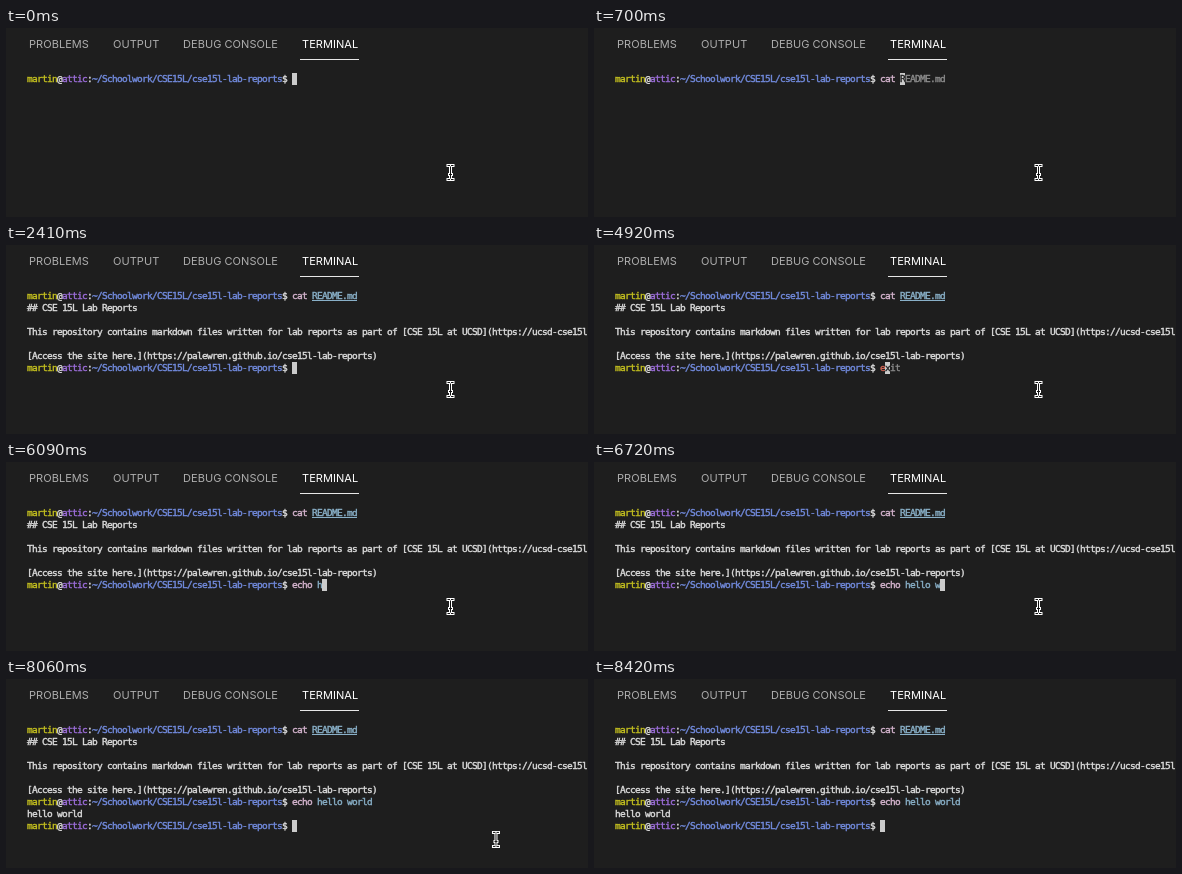
Recreate the animation shown at these times as an HTML page. Size 582 px wide and 189 px high, loop 8.79 s.

```html
<!DOCTYPE html>
<html lang="en">
<head>
<meta charset="utf-8">
<title>Terminal session</title>
<style>
  html, body { margin: 0; width: 100%; height: 100%; overflow: hidden; background: #1e1e1e; }
  svg { display: block; width: 582px; height: 189px; }
  text { white-space: pre; }
  .tab { font: 11px Inter, "Liberation Sans", sans-serif; letter-spacing: .05px; fill: #adadad; }
  .on { fill: #fff; }
  .mono { font: 9.5px "DejaVu Sans Mono", "Liberation Mono", monospace; stroke-width: .4px; }
</style>
</head>
<body>
<svg viewBox="0 0 582 189" xmlns="http://www.w3.org/2000/svg">
  <rect width="582" height="189" fill="#1e1e1e"/>
  <text class="tab" x="23" y="20">PROBLEMS</text>
  <text class="tab" x="107" y="20">OUTPUT</text>
  <text class="tab" x="177" y="20">DEBUG CONSOLE</text>
  <text class="tab on" x="296" y="20">TERMINAL</text>
  <rect x="294" y="31" width="59" height="1" fill="#e7e7e7"/>
  <g id="screen" class="mono"></g>
  <g id="mouse" fill="none">
    <path stroke="#fff" stroke-width="3" d="M-4-7H4M0-7V7M-4 7H4M-2.5 2H2.5"/>
    <path stroke="#111" d="M-3-7H-.5M.5-7H3M0-6V6M-3 7H-.5M.5 7H3M-1.5 2H1.5"/>
  </g>
</svg>
<script>
const LOOP = 8790, CELL = 5, LINE = 12, LEFT = 21, TOP = 45;
const color = {
  user: '#c5c11f', host: '#9d6edb', path: '#728bde', text: '#dcdcdc',
  command: '#d6b5cf', arg: '#89b0c8', bad: '#d06555', hint: '#8c8c8c',
  block: '#cbcbcb', dark: '#1e1e1e'
};
const prompt = [
  ['martin', color.user], ['@', color.text], ['attic', color.host], [':', color.text],
  ['~/Schoolwork/CSE15L/cse15l-lab-reports', color.path], ['$ ', color.text]
];
const start = prompt.reduce((n, [s]) => n + s.length, 0);

const output = [
  '## CSE 15L Lab Reports', '',
  'This repository contains markdown files written for lab reports as part of [CSE 15L at UCSD](https://ucsd-cse15l-', '',
  '[Access the site here.](https://palewren.github.io/cse15l-lab-reports)'
];

// Each session: prompt row, and [time, typed text, suggested rest]
const sessions = [
  { row: 0, end: 2410, keys: [
    [0, '', ''], [350, 'c', 'lear'], [520, 'ca', 't README.md'], [610, 'cat', ' README.md'],
    [700, 'cat ', 'README.md'], [1060, 'cat R', 'EADME.md'],
    [1330, 'cat README.md ', ''], [2050, 'cat README.md', '']
  ] },
  { row: 6, end: 7250, keys: [
    [2410, '', ''], [4920, 'e', 'xit'], [5100, 'ec', 'ho hello'], [5190, 'ech', 'o hello'],
    [5460, 'echo ', 'hello'], [6090, 'echo h', ''], [6270, 'echo hel', ''],
    [6450, 'echo hell', ''], [6540, 'echo hello', ''], [6630, 'echo hello ', ''],
    [6720, 'echo hello w', ''], [6810, 'echo hello wo', ''],
    [6900, 'echo hello wor', ''], [6980, 'echo hello world', '']
  ] },
  { row: 8, end: Infinity, keys: [[7250, '', '']] }
];

const screen = document.getElementById('screen');
const mouse = document.getElementById('mouse');

const colX = col => LEFT + col * CELL;
const rowY = row => TOP + row * LINE;

function add(tag, attrs, content = '') {
  const el = document.createElementNS('http://www.w3.org/2000/svg', tag);
  for (const name in attrs) el.setAttribute(name, attrs[name]);
  el.textContent = content;
  screen.append(el);
}

function box(col, row, cells, dy, height, fill) {
  add('rect', { x: colX(col), y: rowY(row) + dy, width: cells * CELL, height, fill });
}

// Places text on the character grid and returns the next column
function write(col, row, s, fill) {
  if (s) {
    const x = [...s].map((_, i) => colX(col + i)).join(' ');
    add('text', { x, y: rowY(row) + 9, fill, stroke: fill }, s);
  }
  return col + s.length;
}

function drawPrompt(row) {
  let col = 0;
  for (const [s, fill] of prompt) col = write(col, row, s, fill);
}

function drawCommand(row, typed) {
  const [word] = typed.split(' ');
  const known = word === 'cat' || word === 'echo';
  const col = write(start, row, word, known ? color.command : color.bad);
  const rest = typed.slice(word.length);
  write(col, row, rest, color.arg);
  const name = rest.trim();
  if (word === 'cat' && name) box(col + 1, row, name.length, 10, 1, color.arg);
}

function drawScreen(t) {
  screen.replaceChildren();
  for (const { row, end, keys } of sessions) {
    if (t < keys[0][0]) break;
    const [, typed, hint] = keys.filter(k => k[0] <= t).pop();
    drawPrompt(row);
    drawCommand(row, typed);
    if (t >= end) continue;
    const col = start + typed.length;
    box(col, row, 1, 0, LINE, color.block);
    write(col, row, hint.slice(0, 1), color.dark);
    write(col + 1, row, hint.slice(1), color.hint);
  }
  if (t >= 2410) output.forEach((s, i) => write(0, 1 + i, s, color.text));
  if (t >= 7250) write(0, 7, 'hello world', color.text);
}

// The pointer leaves through the bottom edge in even time steps
function drawMouse(t) {
  const step = t < 7880 ? 0 : Math.floor((t - 7880) / 90) + 1;
  const p = Math.pow(Math.min(step, 6) / 6, 1.4);
  mouse.setAttribute('transform', `translate(${444.5 + 120 * p} ${144.5 + 42 * p})`);
  mouse.setAttribute('visibility', step > 6 ? 'hidden' : 'visible');
}

const times = sessions.flatMap(s => s.keys.map(k => k[0]));
let shown = -1;

function render(t) {
  const current = times.filter(k => k <= t).pop();
  if (current !== shown) {
    shown = current;
    drawScreen(t);
  }
  drawMouse(t);
}

const begin = performance.now();
function tick() {
  render((performance.now() - begin) % LOOP);
  requestAnimationFrame(tick);
}
tick();
</script>
</body>
</html>
```
